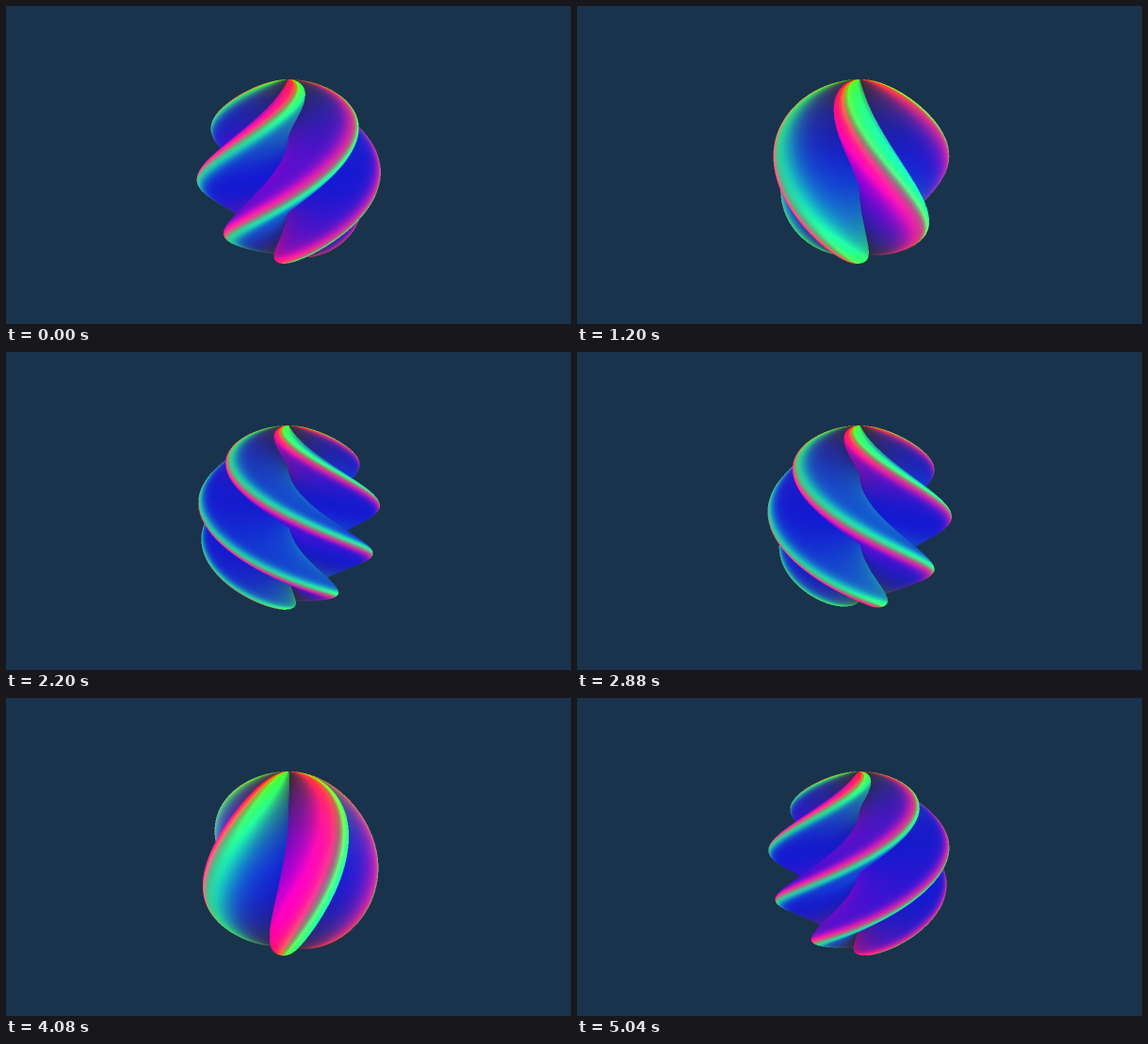
An HTML page with a canvas that plays this animation: 600x338 px, repeating every 5080 ms.

```html
<!DOCTYPE html>
<html lang="en">
<head>
<meta charset="utf-8">
<title>Twisting petals</title>
<style>
  html, body { margin: 0; width: 100%; height: 100%; overflow: hidden; background: #1a334c; }
  canvas { display: block; width: 600px; height: 338px; }
</style>
</head>
<body>
<canvas id="stage" width="600" height="338"></canvas>
<script>
const LOOP = 5080, STEP = 40;
const RAD = Math.PI / 180;
const PETALS = 5, ACROSS = 48, ALONG = 84;
const HALF = 36 * RAD;              // half the angle of one petal
const SCALE = 2, BOX = 204;         // supersampled square around the shape
const SIZE = BOX * SCALE;
const CX = 300, CY = 176;
const DIST = Math.sqrt(17), FOCAL = 392;
const TILT_SIN = 1 / DIST, TILT_COS = 4 / DIST;

const ctx = document.getElementById('stage').getContext('2d');
const buffer = document.createElement('canvas');
buffer.width = buffer.height = SIZE;
const bctx = buffer.getContext('2d');
const image = bctx.createImageData(SIZE, SIZE);
const pixels = image.data;
const depth = new Float32Array(SIZE * SIZE);

const ROW = ACROSS + 1;
const verts = new Float32Array(ROW * (ALONG + 1) * 6);   // x, y, depth, r, g, b
const bell = v => Math.exp(-v * v);

function paint(out, at, delta, crest, y, g, twist, r) {
  const side = Math.sign(delta);
  const off = Math.abs(delta);
  const lean = 1 / Math.sqrt(1 + twist * twist * r * r);
  const turn = Math.tanh(off / (7 * RAD)) * (100 - 35 * off / HALF) * RAD;
  const nx = Math.sin(crest + side * turn) * lean;
  const left = nx < 0 ? nx * nx : 0;
  const right = nx > 0 ? nx * nx : 0;
  const pole = y * y * lean * lean;
  const u = delta / (10 * RAD * lean);
  const shade = 255 * (1 - 0.45 * pole * (1 - g));
  out[at] = shade * (0.08 + 0.85 * left + 0.7 * bell(u + 0.7) + 0.2 * pole);
  out[at + 1] = shade * (0.1 + 0.8 * right - 0.15 * left + 0.7 * bell(u - 0.7) + 0.15 * pole);
  out[at + 2] = shade * (0.82 - 0.3 * bell(u) - 0.55 * pole);
}

function buildPetal(index, base, twist) {
  let at = 0;
  for (let j = 0; j <= ALONG; j++) {
    const lat = (j / ALONG - 0.5) * Math.PI;
    const y = Math.sin(lat), rho = Math.cos(lat);
    const crest = base + index * 2 * HALF + twist * y;
    for (let i = 0; i <= ACROSS; i++, at += 6) {
      const delta = HALF * Math.sin((i / ACROSS - 0.5) * Math.PI);
      const g = Math.pow(Math.max(0, Math.cos(delta * PETALS / 2)), 0.75);
      const r = rho * g;
      const x = r * Math.sin(crest + delta), z = r * Math.cos(crest + delta);
      const far = DIST - (z * TILT_COS + y * TILT_SIN);
      const k = FOCAL / far;
      verts[at] = (BOX / 2 + x * k) * SCALE;
      verts[at + 1] = (BOX / 2 - (y * TILT_COS - z * TILT_SIN) * k) * SCALE;
      verts[at + 2] = far;
      paint(verts, at + 3, delta, crest, y, g, twist, r);
    }
  }
}

function triangle(a, b, c) {
  const v = verts;
  const ax = v[a], ay = v[a + 1], bx = v[b], by = v[b + 1], cx = v[c], cy = v[c + 1];
  const area = (bx - ax) * (cy - ay) - (by - ay) * (cx - ax);
  if (Math.abs(area) < 1e-6) return;
  const x0 = Math.max(0, Math.ceil(Math.min(ax, bx, cx) - 0.5));
  const x1 = Math.min(SIZE - 1, Math.floor(Math.max(ax, bx, cx) - 0.5));
  const y0 = Math.max(0, Math.ceil(Math.min(ay, by, cy) - 0.5));
  const y1 = Math.min(SIZE - 1, Math.floor(Math.max(ay, by, cy) - 0.5));
  for (let py = y0; py <= y1; py++) {
    const y = py + 0.5;
    for (let px = x0; px <= x1; px++) {
      const x = px + 0.5;
      const wa = ((bx - x) * (cy - y) - (by - y) * (cx - x)) / area;
      const wb = ((cx - x) * (ay - y) - (cy - y) * (ax - x)) / area;
      const wc = 1 - wa - wb;
      if (wa < -1e-4 || wb < -1e-4 || wc < -1e-4) continue;
      const z = wa * v[a + 2] + wb * v[b + 2] + wc * v[c + 2];
      const p = py * SIZE + px;
      if (z >= depth[p]) continue;
      depth[p] = z;
      for (let n = 0; n < 3; n++) {
        pixels[p * 4 + n] = wa * v[a + 3 + n] + wb * v[b + 3 + n] + wc * v[c + 3 + n];
      }
      pixels[p * 4 + 3] = 255;
    }
  }
}

function fillPetal() {
  for (let j = 0; j < ALONG; j++) {
    for (let i = 0; i < ACROSS; i++) {
      const a = (j * ROW + i) * 6, b = a + 6, c = a + ROW * 6, d = c + 6;
      triangle(a, b, c);
      triangle(b, d, c);
    }
  }
}

function draw(ms) {
  const tau = (42 + 0.0594 * ms) * RAD;
  const twist = 122 * RAD * Math.cos(tau);
  const base = (-18.5 - 187 * Math.sin(tau)) * RAD;
  pixels.fill(0);
  depth.fill(1e9);
  for (let n = 0; n < PETALS; n++) {
    buildPetal(n, base, twist);
    fillPetal();
  }
  bctx.putImageData(image, 0, 0);
  ctx.fillStyle = '#1a334c';
  ctx.fillRect(0, 0, 600, 338);
  ctx.drawImage(buffer, CX - BOX / 2, CY - BOX / 2, BOX, BOX);
}

const start = performance.now();
let shown = -1;
function tick() {
  const ms = Math.floor(((performance.now() - start) % LOOP) / STEP) * STEP;
  if (ms !== shown) {
    shown = ms;
    draw(ms);
  }
  requestAnimationFrame(tick);
}
tick();
</script>
</body>
</html>
```
